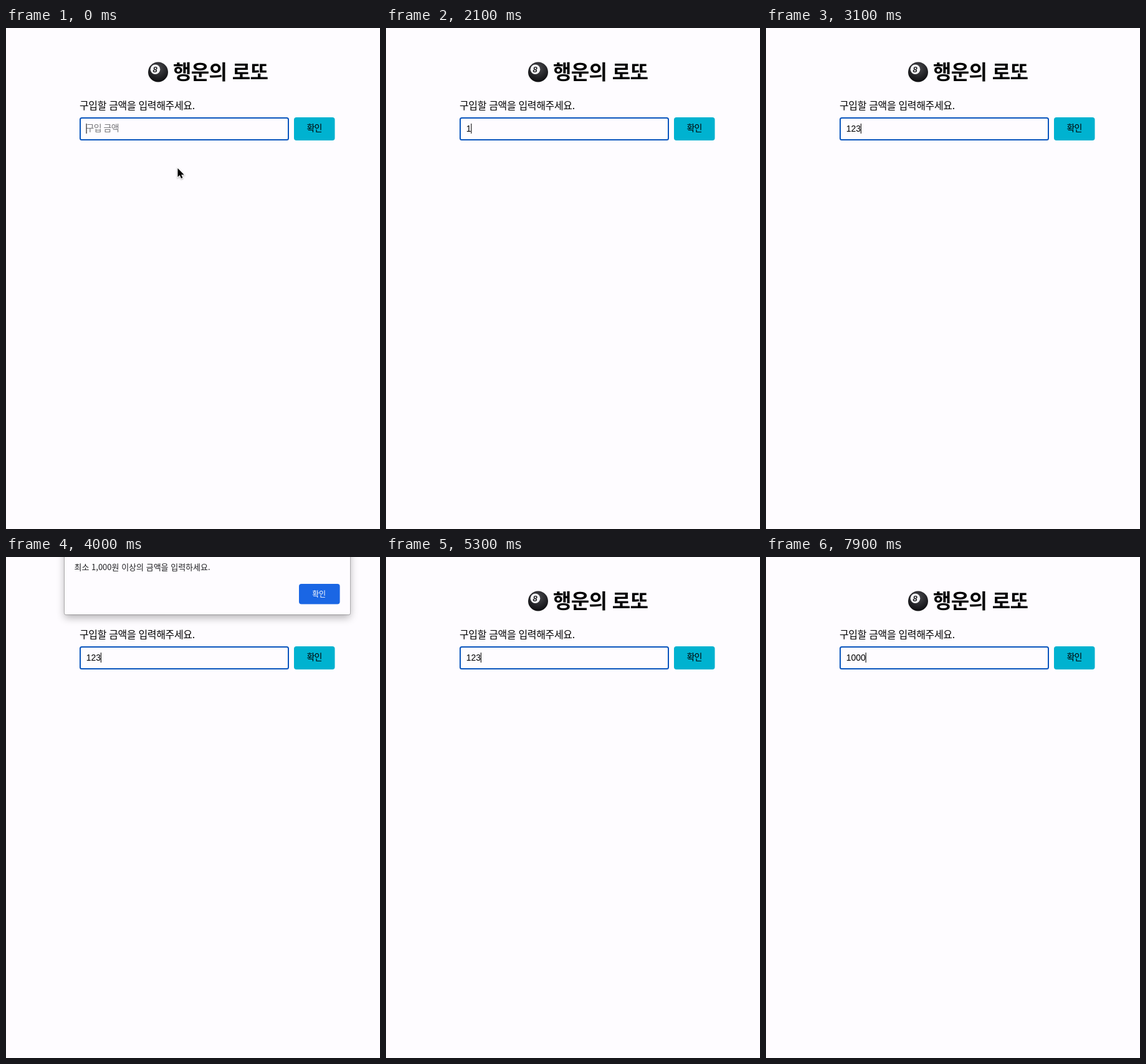
Animation, 600 px wide and 802 px high, one loop 8 s. Source, as an HTML page:

```html
<!DOCTYPE html>
<html lang="ko">
<head>
<meta charset="utf-8">
<style>
  html, body { margin: 0; width: 100%; height: 100%; overflow: hidden; background: #fefcff; }
  svg, #dialog { position: absolute; left: 0; top: 0; }
  text { font-family: "Noto Sans CJK KR", "Noto Sans CJK", sans-serif; white-space: pre; }
  .digits { font-family: "Liberation Sans", Arial, sans-serif; }
  #dialog { width: 600px; height: 110px; transform-origin: 323px 92px; }
  #sheet {
    position: absolute; left: 94px; top: -60px; width: 458px; height: 152px;
    background: #fefcff; border-radius: 0 0 2px 2px;
    box-shadow: 0 0 0 .7px rgba(0,0,0,.3), 0 5px 13px rgba(0,0,0,.3);
  }
</style>
</head>
<body>
<svg width="600" height="802">
  <defs>
    <radialGradient id="gloss" cx=".5" cy=".3" r=".75">
      <stop offset="0" stop-color="#4a4a4e"/>
      <stop offset=".55" stop-color="#26262a"/>
      <stop offset="1" stop-color="#08080a"/>
    </radialGradient>
  </defs>
  <circle cx="244" cy="70.5" r="16" fill="url(#gloss)"/>
  <circle cx="239.5" cy="66.3" r="7.8" fill="#f4f4f6"/>
  <text class="digits" x="235.6" y="70.8" font-size="13" font-weight="700" font-style="italic" fill="#1c1c1f">8</text>
  <text x="268" y="82" font-size="32" font-weight="700" letter-spacing="-.65">행운의 로또</text>
  <text x="118" y="129.5" font-size="16" letter-spacing="-.35">구입할 금액을 입력해주세요.</text>
  <rect id="field" fill="#fefcff"/>
  <text id="hint" x="128.5" y="165.3" font-size="14" letter-spacing="-.6" fill="#757578">구입 금액</text>
  <text id="value" class="digits" x="128.7" y="165.8" font-size="14"></text>
  <rect id="caret" y="153" width="1.1" height="16" fill="#111"/>
  <rect x="462" y="143" width="65.5" height="37" rx="4" fill="#00b2d0"/>
  <text x="482.6" y="165.2" font-size="14" letter-spacing="-.9">확인</text>
</svg>
<div id="dialog">
  <div id="sheet"></div>
  <svg width="600" height="110">
    <text x="109.5" y="21.3" font-size="13" fill="#1d1d20">최소 1,000원 이상의 금액을 입력하세요.</text>
    <rect x="470" y="43" width="65.6" height="32.5" rx="4" fill="#1a66e4"/>
    <text x="491.2" y="63.5" font-size="12" font-weight="500" letter-spacing="-.3" fill="#fff">확인</text>
  </svg>
</div>
<svg width="600" height="802" style="pointer-events:none">
  <g id="mouse" style="filter:drop-shadow(0 1px 1px rgba(0,0,0,.35))">
    <path d="M.5 .5V14.6L3.8 11.6 6 16.8 8.4 15.8 6.2 10.7H10.6Z" stroke="#fff" stroke-width="1.8" paint-order="stroke"/>
  </g>
</svg>
<script>
const LOOP = 8000, STEP = 100;
const OPEN = 3200, CLOSE = 4800, FADE = 200;
const BLUR = 4700, REFOCUS = 5100;
const DIGIT = 7.786;
// [time, field content]
const edits = [
  [0, ''], [2100, '1'], [2400, '12'], [2700, '123'], [REFOCUS, '123'],
  [5700, ''], [6000, '1'], [7300, '10'], [7500, '100'], [7700, '1000']
];
const el = id => document.getElementById(id);
const clamp = v => Math.max(0, Math.min(1, v));
const setAll = (node, attrs) => {
  for (const name in attrs) node.setAttribute(name, attrs[name]);
};
const show = (node, on) => { node.style.visibility = on ? 'visible' : 'hidden'; };

function drawField(t) {
  const [since, content] = edits.findLast(e => e[0] <= t);
  const focused = t < BLUR || t >= REFOCUS;
  setAll(el('field'), focused
    ? { x: 119, y: 144, width: 334, height: 35, rx: 2.5, stroke: '#0a55bd', 'stroke-width': 2 }
    : { x: 119, y: 143.5, width: 334.5, height: 36, rx: 2, stroke: '#55555a', 'stroke-width': 1 });
  el('value').textContent = content;
  show(el('hint'), !content);
  // The caret stops blinking while the dialog is open.
  const held = t >= OPEN && t < BLUR;
  show(el('caret'), focused && (held || (t - since) % 1100 < 550));
  el('caret').setAttribute('x', 128.5 + content.length * DIGIT);
}

function drawDialog(t) {
  const k = clamp((t - OPEN) / FADE) * clamp(1 - (t - CLOSE) / FADE);
  const tilt = 2 * (1 - k);
  const dialog = el('dialog');
  show(dialog, k > 0);
  dialog.style.opacity = k ** .68;
  dialog.style.transform = tilt
    ? `perspective(300px) translateY(${-6.6 * tilt}px) rotateX(${3.2 * tilt}deg) scaleY(${1 + .018 * tilt})`
    : 'none';
}

function drawMouse(t) {
  const p = clamp((t - 100) / 800), ease = p * p * (3 - 2 * p);
  el('mouse').setAttribute('transform', `translate(${275 + 130 * ease} ${224 + 111 * ease})`);
  show(el('mouse'), t < edits[1][0]);
}

const start = performance.now();
function frame() {
  const t = Math.floor((performance.now() - start) % LOOP / STEP) * STEP;
  drawField(t);
  drawDialog(t);
  drawMouse(t);
  requestAnimationFrame(frame);
}
frame();
</script>
</body>
</html>
```
